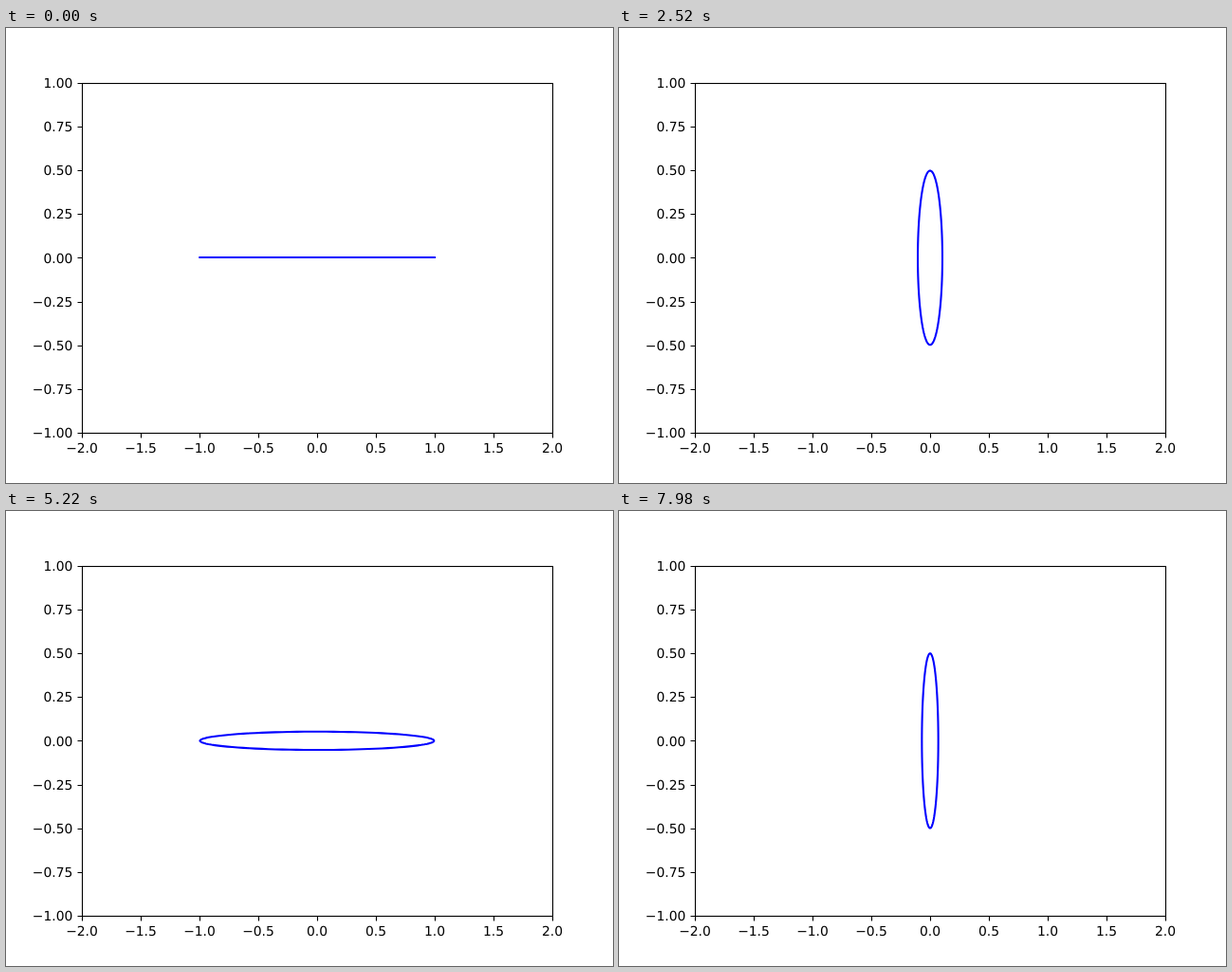
Animation, 640 px wide and 480 px high, one loop 8000 ms. Source, as an HTML page:

```html
<!DOCTYPE html>
<html lang="en">
<head>
<meta charset="utf-8">
<title>Turning ellipse</title>
<style>
  html, body { margin: 0; width: 100%; height: 100%; overflow: hidden; background: #fff; }
  svg { display: block; }
  text {
    font: 13.889px "DejaVu Sans", sans-serif;
    text-rendering: geometricPrecision;
  }
  .axes { fill: none; stroke: #000; stroke-width: 1.111; }
  #curve {
    fill: none;
    stroke: #00f;
    stroke-width: 2.083;
    stroke-linejoin: round;
    stroke-linecap: square;
  }
</style>
</head>
<body>
<svg width="640" height="480" viewBox="0 0 640 480">
  <path id="curve"/>
  <rect class="axes" x="80.5" y="58.5" width="496" height="369"/>
  <path class="axes" id="ticks"/>
  <g id="labels"></g>
</svg>
<script>
const SVG = "http://www.w3.org/2000/svg";
const LOOP = 8000, STEP = 30, POINTS = 100;
const curve = document.getElementById("curve");
const labels = document.getElementById("labels");

const toX = x => 328 + 124 * x;
const toY = y => 242.4 - 184.8 * y;
const format = (value, digits) => value.toFixed(digits).replace("-", "\u2212");

function addLabel(content, x, y, anchor) {
  const text = document.createElementNS(SVG, "text");
  text.setAttribute("x", x);
  text.setAttribute("y", y);
  text.setAttribute("text-anchor", anchor);
  text.textContent = content;
  labels.append(text);
}

function drawAxes() {
  let ticks = "";
  for (let i = -4; i <= 4; i++) {
    const x = toX(i / 2), y = toY(i / 4);
    ticks += `M${x + 0.5} 427.5v5M80.5 ${Math.round(y) + 0.5}h-5`;
    addLabel(format(i / 2, 1), x, 448, "middle");
    addLabel(format(i / 4, 2), 70.3, Math.round(y + 5.28), "end");
  }
  document.getElementById("ticks").setAttribute("d", ticks);
}

// The ellipse turns by one degree per step.
function drawCurve(step) {
  const angle = step * Math.PI / 180;
  const a = Math.cos(angle), b = Math.sin(angle) / 2;
  const flat = step % 180 === 0;
  const points = Array.from({ length: POINTS }, (_, i) => {
    const theta = 2 * Math.PI * i / (POINTS - 1);
    const y = flat ? 242 : toY(b * Math.sin(theta));
    return `${toX(a * Math.cos(theta)).toFixed(3)} ${y.toFixed(3)}`;
  });
  curve.setAttribute("d", "M" + points.join("L"));
}

const start = performance.now();
function tick() {
  const time = (performance.now() - start) % LOOP;
  drawCurve(Math.floor(time / STEP));
  requestAnimationFrame(tick);
}

drawAxes();
tick();
</script>
</body>
</html>
```
